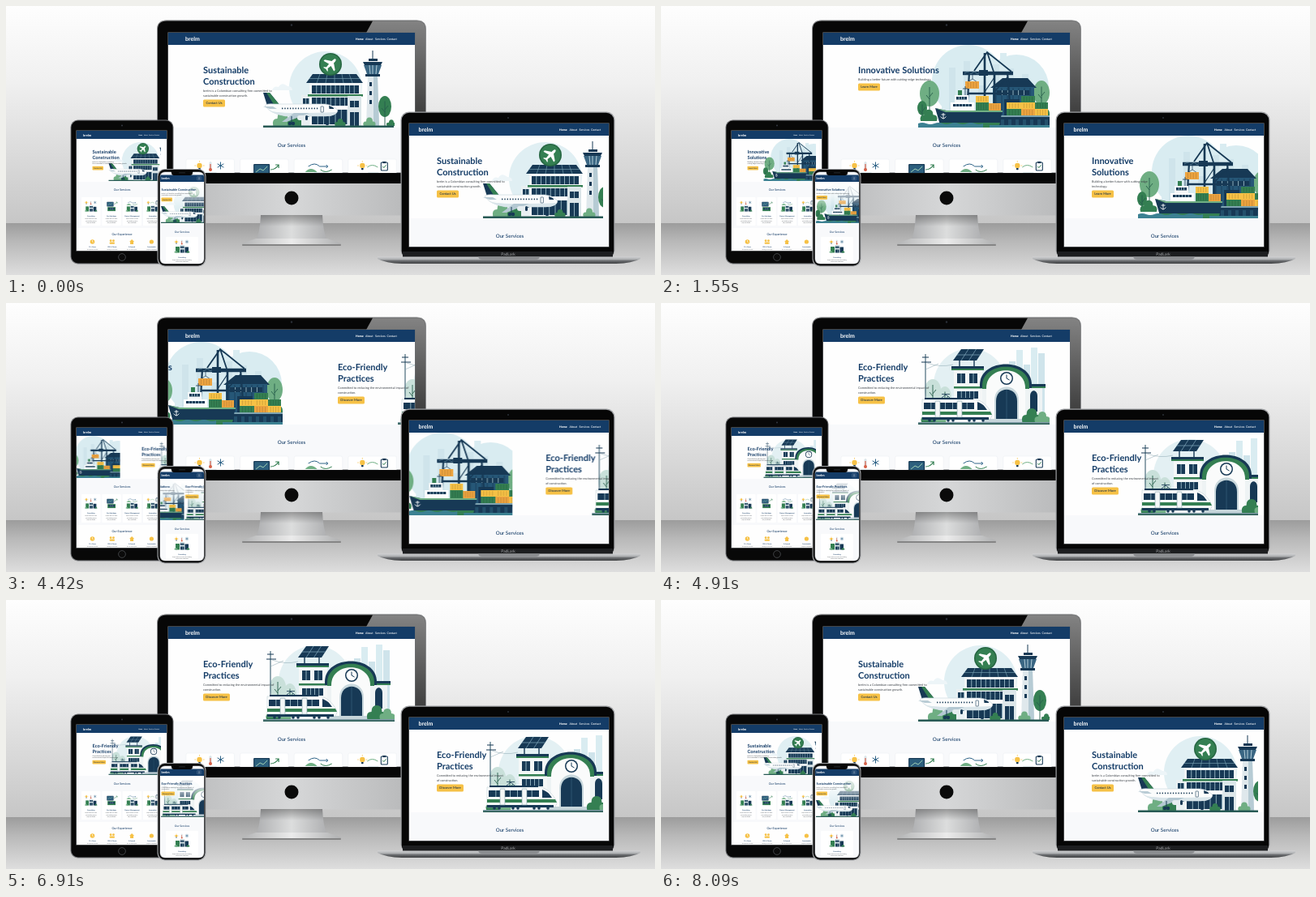
Animation, 800 px wide and 332 px high, one loop 8120 ms. Source, as an HTML page:

```html
<!DOCTYPE html>
<html lang="en">
<head>
<meta charset="utf-8">
<title>Responsive site on four screens</title>
<style>
html, body { margin: 0; width: 100%; height: 100%; overflow: hidden; background: #fff; }
svg { display: block; }
#stage { width: 100vw; height: 100vh; }
text { font-family: Lato, "Open Sans", sans-serif; text-rendering: geometricPrecision; }
</style>
</head>
<body>
<svg id="stage" viewBox="0 0 800 332"></svg>
<script>
const NAVY = '#143c67', DARK = '#173955', GREEN = '#347f52', LEAF = '#6fae83',
  SKY = '#d9ecf1', YELLOW = '#f6c146', PALE = '#f8f9fb', INK = '#3c4248', BRAND = 'brelm';
const LOOP = 8120, STARTS = [805, 4137, 7470], SLIDE = 600;

const rect = (x, y, w, h, fill, r = 0, more = '') =>
  `<rect x="${x}" y="${y}" width="${w}" height="${h}" rx="${r}" fill="${fill}" ${more}/>`;
const circ = (x, y, r, fill, more = '') => `<circle cx="${x}" cy="${y}" r="${r}" fill="${fill}" ${more}/>`;
const path = (d, fill, more = '') => `<path d="${d}" fill="${fill}" ${more}/>`;
const line = (d, color, w = 1) => path(d, 'none', `stroke="${color}" stroke-width="${w}"`);
const text = (x, y, size, str, fill = NAVY, weight = 400, anchor = 'start') =>
  `<text x="${x}" y="${y}" font-size="${size}" fill="${fill}" font-weight="${weight}" text-anchor="${anchor}">${str}</text>`;
const mid = (x, y, size, str, fill, weight) => text(x, y, size, str, fill, weight, 'middle');
const repeat = (n, fn) => Array.from({ length: n }, (_, i) => fn(i)).join('');
const gradient = (id, stops, dir = 'x2="0" y2="1"') => `<linearGradient id="${id}" ${dir}>` +
  stops.map(([o, c, a = 1]) => `<stop offset="${o}" stop-color="${c}" stop-opacity="${a}"/>`).join('') + '</linearGradient>';

const tree = (x, y, rx, ry, foot, fill) =>
  `<ellipse cx="${x}" cy="${y}" rx="${rx}" ry="${ry}" fill="${fill}"/>` +
  line(`M${x},${foot}V${y - ry / 2}M${x},${y + 4}l4,-5M${x},${y + 7}l-4,-5`, '#285f4c', 0.9);
const bush = (x, y, s, fill) => path(
  `M${x - 9 * s},${y}q-2,${-7 * s} ${4 * s},${-7 * s}q0,${-6 * s} ${5 * s},${-6 * s}q${5 * s},0 ${5 * s},${6 * s}q${6 * s},0 ${4 * s},${7 * s}z`, fill);
const skyline = (x, base, heights, w = 9) =>
  heights.map((h, i) => rect(x + i * w, base - h, w - 1, h, i % 2 ? '#cfe4eb' : SKY)).join('');
const windows = (x, y, w, h, n) => rect(x, y, w, h, DARK) +
  repeat(n - 1, i => rect(x + w / n * (i + 1) - 0.4, y, 0.8, h, '#a9c8d2'));
const crate = (x, y, w, h, fill) => rect(x, y, w, h, fill) +
  repeat(4, i => line(`M${x + w / 5 * (i + 1)},${y + 1}v${h - 2}`, '#00000040', 0.6));
// Arch outline from the left foot to the right foot
const arch = (x, w, foot, spring, top) =>
  `M${x},${foot}V${spring}C${x},${top} ${x + w},${top} ${x + w},${spring}V${foot}`;

function airport() {
  const icon = 'M0,-9C1.6,-9 1.7,-6 1.7,-4L9,1V3L1.7,1 1.2,6 3.5,8V9L0,8 -3.5,9V8L-1.2,6 -1.7,1 -9,3V1L-1.7,-4C-1.7,-6 -1.6,-9 0,-9Z';
  return circ(394, 101, 45, '#e0eff3') + rect(340, 149, 130, 5, '#fff') +
    path('M328,104q2,-6 8,-4q4,-7 11,-1q6,0 6,5z', '#edf5f8') +
    bush(341, 148, 1.3, LEAF) + bush(360, 148, 1.4, GREEN) +
    // control tower
    line('M452,55V68', DARK, 1) + rect(447, 65, 11, 3, DARK) +
    path('M440,69H464L462,73H442Z', DARK) + path('M441,73H463L459,84H445Z', '#3a6683') +
    line('M448,73l1,11M452,73v11M457,73l-1,11', '#d4e8ee', 0.8) + rect(443, 84, 18, 3, DARK) +
    path('M446,87H458L460,148H444Z', '#dfe8ec') + path('M453,87H458L460,148H453Z', '#b6cbd4') +
    [94, 105, 116].map(y => rect(448, y, 3, 5, DARK)).join('') +
    // terminal
    rect(364, 110, 15, 38, '#e9f0f2') + windows(366, 114, 11, 9, 3) + windows(366, 128, 11, 9, 3) +
    rect(374, 94, 64, 54, '#f1f5f6') + windows(377, 98, 58, 10, 10) + windows(377, 113, 58, 10, 10) +
    windows(377, 128, 58, 18, 8) + rect(372, 109, 68, 2.6, GREEN) + rect(372, 124, 68, 2.6, '#fff') +
    rect(421, 111, 17, 37, '#dce6e9') + windows(424, 117, 11, 8, 2) + windows(424, 131, 11, 17, 2) +
    rect(398, 82, 5, 5, DARK) + path('M378,84H432L440,95H370Z', DARK) +
    line('M374,89.5H436M387,84l-4,11M396,84l-2,11M405,84v11M414,84l2,11M423,84l4,11', '#7ea8b9', 0.6) +
    circ(400, 72, 14, '#276743') + circ(400, 72, 12.4, GREEN) +
    path(icon, '#fff', 'transform="translate(400,72) rotate(45)"') +
    // greenery and apron
    tree(467, 124, 8, 13, 148, GREEN) + bush(448, 148, 0.8, LEAF) + bush(475, 148, 0.6, GREEN) + bush(412, 148, 0.7, GREEN) +
    rect(317, 147.5, 161, 2.5, '#285a55') +
    // airliner
    path('M317,107H325L338,123H322Z', DARK) + path('M321,107H325L338,123H331Z', GREEN) +
    path('M319,123Q321,120 331,121L393,121Q404,122 409,129Q408,135 395,136L345,136Q326,133 319,123Z', '#fbfcfc', 'stroke="#c5d4da" stroke-width=".6"') +
    path('M324,129Q338,134 408,131Q405,136 395,136H345Q332,134 324,129Z', '#d9e5ea') +
    path('M398,123l5,2 1.5,2h-6z', DARK) + repeat(14, i => rect(340 + i * 3.3, 125.5, 1.4, 1.8, DARK, 0.5)) +
    rect(388, 124, 3.4, 7, 'none', 0.5, `stroke="${DARK}" stroke-width=".6"`) +
    path('M317,124h12l5,3h-9z', '#b9ccd5') + path('M355,132H374L346,143H340Z', '#b4c8d2') +
    rect(359, 135, 13, 6, '#e5edf0', 3) + rect(369, 135, 3, 6, DARK, 1.5) +
    line('M396,136v8M352,136v8', DARK, 1) + circ(396, 145, 2.2, DARK) + circ(350, 145, 2.2, DARK) + circ(354, 145, 2.2, DARK);
}

function harbour() {
  return circ(379, 93, 45, SKY) + circ(438, 100, 40, SKY) +
    skyline(346, 128, [38, 52, 42, 60, 48, 30, 45, 56, 70, 51, 63, 44, 34]) +
    tree(331, 108, 12, 16, 140, LEAF) + tree(322, 126, 6, 9, 142, GREEN) +
    tree(469, 107, 10, 15, 140, LEAF) + bush(474, 140, 1, GREEN) + bush(330, 142, 1.1, GREEN) +
    // warehouse
    path('M406,101L421,89H452L463,101Z', DARK) + rect(409, 100, 51, 35, '#265777') +
    repeat(7, i => line(`M${413 + i * 7},101V134`, '#173955', 0.7)) + windows(414, 104, 40, 6, 6) + rect(423, 115, 19, 20, DARK) +
    // crane
    line('M386,80L402,57L432,81M402,57L410,81', DARK, 1.8) + line('M399,58V134M411,81V134', DARK, 2.6) +
    line('M372,83H434', DARK, 4.5) + line('M374,83l4,-2 4,3 4,-3 4,3 4,-3', '#7197ab', 0.6) +
    line('M380,82L377,132M427,82L431,133', DARK, 2.2) + line('M378,108H430', DARK, 2.4) +
    line('M399,106L411,88M411,106L427,88', DARK, 1.2) + rect(392, 79, 11, 7, DARK) +
    rect(378, 134, 8, 2, DARK) + line('M384,84v6l-6,4M384,90l6,4', DARK, 0.7) + crate(375, 93, 17, 9, '#eda440') +
    // cargo
    crate(426, 119, 18, 8, YELLOW) + crate(426, 127, 18, 9, GREEN) + crate(444, 111, 17, 8, GREEN) +
    crate(444, 119, 17, 8, YELLOW) + crate(444, 127, 17, 9, '#eda440') + crate(461, 119, 16, 8, GREEN) + crate(461, 127, 16, 9, YELLOW) +
    rect(405, 135, 74, 15, DARK) + rect(405, 135, 74, 2, '#7fa4b1') + repeat(8, i => rect(410 + i * 9, 140, 4, 10, '#23506b')) +
    // ship
    crate(388, 111, 16, 8, YELLOW) + crate(388, 119, 16, 10, GREEN) + crate(404, 120, 15, 9, '#eda440') +
    rect(362, 110, 17, 9, '#f4f7f8') + windows(364, 112, 13, 3.5, 4) + rect(357, 119, 29, 10, '#fff') + windows(360, 121, 23, 3, 6) +
    rect(366, 104, 5, 6, GREEN) + line('M375,110V99M372,102h6', DARK, 0.8) +
    path('M338,126L352,129H421L416,150H345Z', DARK) + path('M338,126L352,129H421V131H351Z', LEAF) +
    path('M343,144H418L416,150H345Z', GREEN) +
    line('M348,132v7M345.5,134h5M344.7,136.5q3.3,5 6.6,0', '#fff', 0.9) +
    path('M317,145q5,-2 10,0t10,0t10,0t10,0t10,0t10,0t10,0t10,0V150H317Z', '#3c8192') + rect(405, 147, 74, 3, '#3c8192');
}

function station() {
  return circ(381, 101, 45, '#e3f0f3') + skyline(402, 146, [55, 68, 62, 74, 88, 70, 91, 84]) +
    tree(335, 108, 10, 14, 146, '#c9e0da') + tree(350, 116, 8, 13, 146, '#c9e0da') +
    // overhead line mast
    line('M326,63V147', '#49697a', 1.2) + line('M322,67h8M321,73H333', DARK, 1) +
    line('M326,82L342,75M328,74Q344,80 360,76', '#89a4af', 0.5) +
    // offices with roof panels
    path('M360,71L370,57H398L389,71Z', DARK) + line('M365,64H393.5M379,57l-9,14M388.5,57l-9,14', '#83aabd', 0.7) +
    line('M368,71v8M386,71v8', DARK, 1.4) + rect(358, 78, 40, 3, DARK) + rect(361, 81, 35, 66, '#f4f7f7') +
    rect(358, 81, 40, 2, GREEN) + windows(365, 87, 10, 12, 2) + windows(380, 87, 10, 12, 2) +
    rect(361, 103, 35, 2.5, GREEN) + windows(365, 109, 26, 9, 5) +
    // hall
    rect(396, 101, 74, 46, '#eef3f4') + rect(450, 100, 24, 3, DARK) + rect(450, 103, 24, 2, GREEN) +
    path(arch(393, 64, 105, 101, 67) + 'Z', DARK) + path(arch(396, 58, 106, 102, 71) + 'Z', GREEN) +
    path(arch(401, 48, 147, 105, 76) + 'Z', '#fafbfb') +
    circ(426, 93, 8, DARK) + circ(426, 93, 6.5, '#fff') + line('M426,88.5V93L429.5,95', DARK, 1) +
    path(arch(411, 30, 147, 120, 98) + 'Z', '#c9d8dd') + path(arch(413, 26, 147, 121, 102) + 'Z', DARK) +
    line('M426,107V147', '#3a6683', 0.6) + path(arch(455, 9, 134, 115, 106) + 'Z', DARK) +
    rect(396, 143, 78, 4, '#c6d5da') +
    bush(457, 147, 1.3, GREEN) + bush(470, 147, 1.0, LEAF) + bush(330, 147, 1, GREEN) + bush(344, 147, 0.8, LEAF) +
    // train
    line('M346,117l5,-4 5,4M346,112.5h10', DARK, 0.8) +
    path('M322,119H388Q399,121 407,135Q410,143 402,144H322Z', '#fbfcfc', 'stroke="#b6c8ce" stroke-width=".5"') +
    rect(325, 117, 60, 2, DARK) + windows(324, 123, 62, 8, 7) + path('M390,122Q397,124 402,132H390Z', DARK) +
    path('M322,134H406L408,138H322Z', GREEN) + rect(322, 141, 82, 3, DARK) +
    [338, 365].map(x => rect(x, 121, 6, 20, '#f4f7f7', 0.5, 'stroke="#7d9aa6" stroke-width=".6"')).join('') +
    [331, 337, 354, 360, 380, 386, 397].map(x => circ(x, 145, 1.8, DARK)).join('') +
    rect(317, 147, 162, 1.2, '#7d9aa6') + rect(317, 148.2, 162, 1.8, '#285a55');
}

// Service pictures on a 40 x 34 grid
const bulb = (x, y) => circ(x, y, 3.2, YELLOW) + rect(x - 1.3, y + 3, 2.6, 2.2, DARK, 0.6) +
  line(`M${x - 6},${y}h1.5M${x + 4.5},${y}h1.5M${x},${y - 6}v1.5`, YELLOW, 0.8);
const houses = rect(4, 18, 10, 15, GREEN) + rect(14, 14, 13, 19, '#e0ebee') + windows(16, 17, 9, 5, 3) + windows(16, 25, 9, 8, 2) +
  rect(27, 19, 9, 14, DARK) + bush(5, 33, 0.4, LEAF) + bush(35, 33, 0.4, GREEN);
const services = [
  bulb(6, 6) + rect(18, 1, 3, 10, '#dbe6ea', 1.5) + rect(18.9, 4, 1.2, 8, '#d56149') + circ(19.5, 11, 2, '#d56149') +
    line('M32,1.5V10.5M28.1,3.8L35.9,8.2M35.9,3.8L28.1,8.2', '#2f6488', 1) + houses,
  rect(6, 4, 20, 14, DARK, 1) + rect(7.2, 5.2, 17.6, 11.6, '#2d5f7d') + line('M9,14l5,-4 4,2 5,-5', '#9fd0b3', 1) +
    line('M27,11q6,0 10,-6m-4,0h4v4', GREEN, 1.2) + rect(8, 20, 24, 12, GREEN) + windows(11, 22, 18, 6, 4),
  path('M3,14q7,-8 15,0z', LEAF) + line('M7,7q8,-6 14,0h10m-2,-2l2,2 -2,2', '#2f6488', 1) + line('M36,11q-8,5 -14,0', GREEN, 1) + houses,
  bulb(7, 6) + rect(30, 2, 8, 10, '#fff', 1, `stroke="${DARK}" stroke-width="1.1"`) + rect(32, 0.9, 4, 2.2, DARK) +
    line('M32,7l1.5,1.6 2.6,-3.2', GREEN, 1) + line('M13,8q6,-5 13,0', LEAF, 1) + houses
];

const slides = [
  { head: ['Sustainable', 'Construction'], sub: `${BRAND} is a Colombian consulting firm committed to sustainable construction growth.`, btn: 'Contact Us' },
  { head: ['Innovative', 'Solutions'], sub: 'Building a better future with cutting-edge technology.', btn: 'Learn More' },
  { head: ['Eco-Friendly', 'Practices'], sub: 'Committed to reducing the environmental impact of construction.', btn: 'Discover More' }
];

// split: heading on two lines; wrap: words on the first line of the copy
const devices = {
  monitor: { x: 200, y: 48, w: 304, h: 102, img: [316, 48, 163, 102], zoom: 1, tx: 243, ty: 83, size: 11, lead: 14,
    sub: 3.85, gap: 8.5, subLead: 6, btn: [27, 9, 4], split: [1, 0, 1], wrap: [8, 9, 7] },
  laptop: { x: 497, y: 160, w: 246, h: 102, img: [587, 160, 149, 102], zoom: 1, tx: 531, ty: 195, size: 11, lead: 14,
    sub: 3.8, gap: 8.5, subLead: 6, btn: [27, 9, 4], split: [1, 1, 1], wrap: [8, 6, 6] },
  tablet: { x: 87, y: 164, w: 111, h: 53, img: [126, 164, 65, 52], zoom: 0.51, tx: 106.5, ty: 182.2, size: 5.75, lead: 6.7,
    sub: 1.9, gap: 3.8, subLead: 2.7, btn: [13.5, 4.8, 2.4], split: [1, 1, 1], wrap: [5, 5, 4] },
  phone: { x: 190, y: 217, w: 54, h: 52, img: [190.5, 218, 53.5, 50], zoom: 0.49, fade: 1, tx: 191.5, ty: 228, size: 3.85, lead: 4.6,
    sub: 1.75, gap: 3.6, subLead: 2.5, btn: [13.5, 4.8, 2.4], split: [0, 0, 0], wrap: [8, 9, 7] }
};

function slide(d, i, shift) {
  const s = slides[i], [ix, iy, iw, ih] = d.img, [bw, bh, bgap] = d.btn;
  const heads = d.split[i] ? s.head : [s.head.join(' ')];
  const words = s.sub.split(' ');
  const lines = [words.slice(0, d.wrap[i]), words.slice(d.wrap[i])].filter(l => l.length);
  const y1 = d.ty + (heads.length - 1) * d.lead + d.gap;
  const by = y1 + (lines.length - 1) * d.subLead + bgap;
  const width = i === 2 ? bw * 1.22 : bw;
  return `<g transform="translate(${shift * d.w})">` + rect(d.x, d.y, d.w + 0.5, d.h, '#fefefe') +
    `<svg x="${ix}" y="${iy}" width="${iw}" height="${ih}" viewBox="316 48 ${iw / d.zoom} ${ih / d.zoom}"><use href="#scene${i}"/></svg>` +
    (d.fade ? rect(d.x, d.y, d.w, 32, 'url(#fade)') : '') +
    heads.map((h, n) => text(d.tx, d.ty + n * d.lead, d.size, h, NAVY, 700)).join('') +
    lines.map((l, n) => text(d.tx, y1 + n * d.subLead, d.sub, l.join(' '), INK)).join('') +
    rect(d.tx, by, width, bh, YELLOW, bh * 0.17) +
    mid(d.tx + width / 2, by + bh * 0.66, bh * 0.45, s.btn, '#24384c', 600) + '</g>';
}
const carousel = name => `<g clip-path="url(#clip-${name})"><g class="track" data-width="${devices[name].w}">` +
  repeat(4, n => slide(devices[name], n % 3, n)) + '</g></g>';

const nav = (x, y, w, h, logo, size, xs, linkSize) => rect(x, y, w, h, NAVY) +
  text(logo, y + h * 0.66, size, BRAND, '#fff', 700) +
  ['Home', 'About', 'Services', 'Contact'].map((s, i) =>
    text(xs[i], y + h * 0.62, linkSize, s, '#fff', i ? 600 : 900)).join('');
const picture = (i, x, y, k) => `<g transform="translate(${x},${y}) scale(${k})">${services[i]}</g>`;

const screens = { monitor: [200, 33, 304, 172.5, 0], laptop: [497, 145, 246, 152, 0], tablet: [87, 154, 111, 148, 0], phone: [190, 205, 54, 113, 6] };
const frame = (name, body) => {
  const [x, y, w, h, r] = screens[name];
  return rect(x - 0.6, y - 0.6, w + 1.2, h + 1.2, '#6d6f72', r) + `<g clip-path="url(#screen-${name})">${body}</g>`;
};

const monitor = () => rect(186, 17.5, 332, 241, 'url(#chin)', 11) + path('M186,219V29Q186,17.5 198,17.5H506Q518,17.5 518,29V219Z', '#8a8b8d') +
  path('M187,219V29Q187,18.5 198,18.5H506Q517,18.5 517,29V219Z', '#070707') +
  path('M452,18.5H506Q517,18.5 517,29V205H504V33H444Z', 'url(#glare)') + circ(352, 23.5, 1.2, '#2b3038') +
  path('M314,258H390Q391,280 396,289H308Q313,280 314,258Z', 'url(#neck)') +
  path('M314,258H390L391,272H313Z', 'url(#shade)') +
  path('M308,287H396L413,293V295.5H291V293Z', 'url(#foot)') + rect(291, 294, 122, 2, '#858585', 1) +
  circ(352, 237, 8.5, '#0a0a0a') +
  frame('monitor', rect(200, 33, 304, 173, PALE) + carousel('monitor') +
    nav(200, 33, 304, 15, 221, 7, [431, 443, 455, 469.5], 3.5) + mid(352, 174, 6.2, 'Our Services', NAVY, 500) +
    repeat(4, i => rect(222 + i * 66.6, 189, 59.5, 60, '#fff', 2, 'stroke="#e8ecf1" stroke-width=".5"') +
      picture(i, 232.5 + i * 66.6, 191, 1)));

const laptop = () => rect(486.5, 130.5, 264, 181, '#a0a2a5', 10) + rect(487.7, 131.7, 261.6, 180, '#060606', 9.5) +
  circ(619, 138, 1, '#2b3038') +
  frame('laptop', rect(497, 145, 246, 152, PALE) + carousel('laptop') +
    nav(497, 145, 246, 15, 508.5, 7, [682, 694.5, 706.5, 721], 3.5) + mid(621, 286, 6.2, 'Our Services', NAVY, 500)) +
  rect(489, 303, 259, 7, '#1d1e20') + mid(619, 308, 5, 'PadLark', '#a5a7aa') +
  path('M458,309.5H782V312Q772,317.5 752,318H488Q468,317.5 458,312Z', 'url(#base)') +
  path('M582,309.5H658Q657,313 653,313H587Q583,313 582,309.5Z', '#8b8d90');

const tablet = () => rect(79.5, 140.5, 127, 178, '#77797c', 9) + rect(80.4, 141.4, 125.2, 176.2, '#080808', 8.5) +
  circ(143, 147.5, 1, '#343a42') + circ(143, 310, 4.4, '#0b0b0b', 'stroke="#55585c" stroke-width=".7"') +
  frame('tablet', rect(87, 154, 111, 148, PALE) + carousel('tablet') +
    nav(87, 154, 111, 10, 95, 4, [163.5, 170, 176, 183], 1.75) + mid(143, 228, 3.7, 'Our Services', NAVY, 500) +
    repeat(4, i => {
      const x = 93 + i * 25.3;
      return rect(x, 236, 23.5, 35, '#fff', 1) + picture(i, x + 3.6, 240, 0.41) +
        mid(x + 11.8, 260, 2, ['Consulting', 'Eco Solutions', 'Project Management', 'Innovation'][i], NAVY, 600) +
        repeat(3, n => mid(x + 11.8, 263.2 + n * 2.4, 1.5, ['Expert advice to make', 'your building project', 'fully sustainable'][n], INK));
    }) +
    rect(87, 274, 111, 28, '#fefefe') + mid(143, 282.5, 3.7, 'Our Experience', NAVY, 500) +
    repeat(4, i => {
      const x = 106.5 + i * 24.3;
      return [circ(x, 291, 2.8, YELLOW) + line(`M${x},289v2l1.4,1`, '#fff', 0.6),
        circ(x - 1.7, 289.7, 1.4, YELLOW) + circ(x + 1.7, 289.7, 1.4, YELLOW) + rect(x - 3.2, 291.4, 6.4, 2.3, YELLOW, 1),
        path(`M${x - 3},291l3,-3 3,3 -1,0v3h-4v-3z`, YELLOW), circ(x, 291, 2.6, YELLOW)][i] +
        mid(x, 298, 2, ['15+ Years', '200+ Clients', '5 Awards', 'Sustainable'][i], NAVY, 600) +
        mid(x, 301, 1.5, ['of experience in field', 'trusting our services', 'won in recent years', 'projects completed'][i], INK);
    }));

const phone = () => rect(186.5, 201, 60, 120.5, '#a2a4a7', 9) + rect(187.6, 202, 57.8, 118.6, '#070707', 8.5) +
  frame('phone', rect(190, 205, 54, 113, PALE) + carousel('phone') + rect(190, 208.5, 54, 8.5, NAVY) +
    text(191.5, 214, 4, BRAND, '#fff', 700) +
    rect(235.5, 210.5, 5.2, 4.4, 'none', 0.6, 'stroke="#7f9ab7" stroke-width=".3"') +
    line('M236.8,211.8h2.6M236.8,212.8h2.6M236.8,213.8h2.6', '#c8d5e2', 0.4) +
    mid(217, 280, 3.3, 'Our Services', NAVY, 500) + rect(197, 285, 40, 40, '#fff', 1) + picture(0, 207, 288, 0.5) +
    mid(217, 310.5, 2, 'Consulting', NAVY, 600) + mid(217, 313.6, 1.5, 'Expert advice to make your building', INK) +
    mid(217, 316, 1.5, 'project fully sustainable', INK)) +
  path('M202,203H232Q230,204 230,206Q230,209 227,209H207Q204,209 204,206Q204,204 202,203Z', '#070707') +
  rect(213, 205.4, 8, 0.9, '#30343a', 0.4);

const clip = (id, x, y, w, h, r) => `<clipPath id="${id}">${rect(x, y, w, h, '#000', r)}</clipPath>`;
const across = 'x2="1" y2="0"';
const defs = '<defs>' +
  gradient('wall', [[0, '#fefefe'], [0.35, '#f0f0f0'], [1, '#c6c6c6']]) +
  gradient('floor', [[0, '#9c9c9c'], [0.35, '#b8b8b8'], [1, '#dedede']]) +
  gradient('chin', [[0, '#b4b5b6'], [0.5, '#d6d7d8'], [1, '#b4b5b6']], across) +
  gradient('neck', [[0, '#aeafb1'], [0.5, '#dcdddd'], [1, '#aeafb1']], across) +
  gradient('shade', [[0, '#444', 0.45], [1, '#444', 0]]) +
  gradient('foot', [[0, '#b4b5b6'], [0.5, '#ebebeb'], [1, '#b0b1b2']], across) +
  gradient('base', [[0, '#d0d1d3'], [0.4, '#a9abad'], [0.55, '#707275'], [1, '#3c3e40']]) +
  gradient('glare', [[0, '#fff', 0.5], [1, '#fff', 0.05]]) +
  gradient('fade', [[0, '#fff', 0.92], [0.45, '#fff', 0.75], [1, '#fff', 0]]) +
  Object.entries(devices).map(([n, d]) => clip('clip-' + n, d.x, d.y, d.w, d.h, 0)).join('') +
  Object.entries(screens).map(([n, s]) => clip('screen-' + n, ...s)).join('') +
  [airport, harbour, station].map((fn, i) => `<g id="scene${i}">${fn()}</g>`).join('') + '</defs>';

document.getElementById('stage').innerHTML = defs +
  rect(0, 0, 800, 269, 'url(#wall)') + rect(0, 268, 800, 64, 'url(#floor)') +
  monitor() + laptop() + tablet() + phone();

for (const track of document.querySelectorAll('.track')) {
  const at = n => `translateX(${-n * track.dataset.width}px)`;
  const steps = [{ offset: 0, transform: at(0) }];
  STARTS.forEach((t, n) => steps.push(
    { offset: t / LOOP, transform: at(n), easing: 'ease-in-out' },
    { offset: (t + SLIDE) / LOOP, transform: at(n + 1) }));
  steps.push({ offset: 1, transform: at(3) });
  track.animate(steps, { duration: LOOP, iterations: Infinity });
}
</script>
</body>
</html>
```
